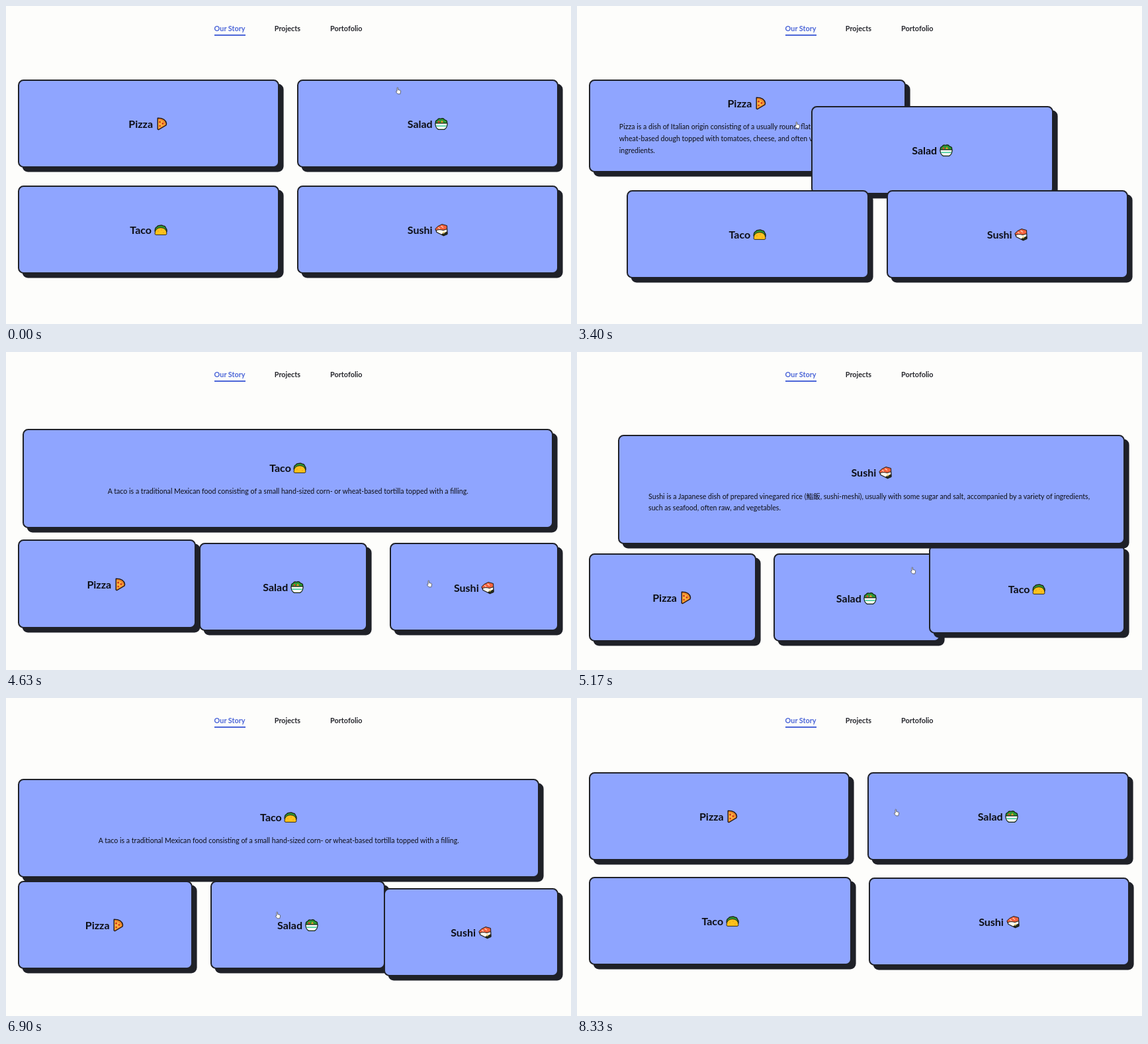
An HTML page that plays this animation: 854x480 px, repeating every 8360 ms.

```html
<!DOCTYPE html>
<html lang="en">
<head>
<meta charset="utf-8">
<title>Expanding cards</title>
<style>
  html, body { margin: 0; width: 100%; height: 100%; overflow: hidden; }
  body { position: relative; background: #fdfdfb; color: #0d0e14; font-family: Lato, "Noto Sans CJK JP", "Noto Sans CJK", sans-serif; }
  nav span { position: absolute; top: 24.7px; font: 700 10.85px/17px Lato, sans-serif; color: #25262c; white-space: nowrap; }
  nav .on { color: #4c66d8; }
  nav .on::after { content: ""; position: absolute; left: 0; right: 0; top: 18.5px; height: 2px; background: #4c66d8; }
  .card {
    position: absolute; box-sizing: border-box; padding: 1.2px 43.8px 0; border: 2px solid #1f2128; border-radius: 8.5px;
    background: #8fa5ff; box-shadow: 6.6px 6.6px 0 #1f2128;
    display: flex; flex-direction: column; align-items: center; justify-content: center;
  }
  h2 { margin: 0; flex: none; font-size: 16px; line-height: 26px; font-weight: 700; white-space: nowrap; display: flex; align-items: center; }
  h2 svg { width: 20px; height: 20px; margin-left: 3.6px; }
  p { margin: 14.6px 0 0; padding-bottom: 1.8px; flex: none; max-width: 100%; font-size: 10.6px; line-height: 17.8px; }
  #cursor { position: absolute; left: 0; top: 0; width: 10px; height: 12px; overflow: visible; }
</style>
</head>
<body>
<nav>
  <span class="on" style="left:314.6px">Our Story</span>
  <span style="left:405.8px">Projects</span>
  <span style="left:490.1px">Portofolio</span>
</nav>

<div class="card">
  <h2>Pizza<svg viewBox="0 0 20 20" stroke="#1c1210" stroke-width="1.3" stroke-linejoin="round">
    <path d="M3.2 1.2Q15 1 16.6 9.6L16 12 4.6 18.8 3.2 18Z" fill="#e8842a"/>
    <path d="M4 4Q12 4 14 11L4.4 17Z" fill="#fbb03c" stroke="none"/>
    <g fill="#d0301f" stroke="none"><circle cx="6.5" cy="7" r="1.5"/><circle cx="11" cy="9.5" r="1.4"/><circle cx="6.6" cy="13" r="1.3"/></g>
  </svg></h2>
  <p>Pizza is a dish of Italian origin consisting of a usually round, flat base of leavened wheat-based dough topped with tomatoes, cheese, and often various other ingredients.</p>
</div>

<div class="card">
  <h2>Salad<svg viewBox="0 0 20 20" stroke="#10200c" stroke-width="1.2" stroke-linejoin="round">
    <path d="M1.5 9Q.5 5 4 4 5.5 1 9 2.2 13 .5 15 3.8 19.5 4.5 18.5 9Z" fill="#2f9a35"/>
    <path d="M.8 9H19.2Q19 16 14.5 18.4H5.5Q1 16 .8 9Z" fill="#f8f9f4"/>
    <path d="M2 12.2H18L17.3 14H2.7Z" fill="#4fd0a4" stroke="none"/>
    <path d="M9 8L11 4.5 13 8Z" fill="#f0982e" stroke="none"/>
    <circle cx="6" cy="6.7" r="1.5" fill="#e0452e" stroke="none"/>
  </svg></h2>
  <p></p>
</div>

<div class="card">
  <h2>Taco<svg viewBox="0 0 20 20" stroke="#1c1a10" stroke-width="1.2" stroke-linejoin="round">
    <path d="M1 12Q1 6.5 4 5.5 5 3 8 3.4 11 2 13.5 3.8 17 4 17.5 7 19.5 9 19 13L17 14Z" fill="#2f9a35"/>
    <path d="M1 15.8Q1.2 6.8 10 6.6 18.8 6.8 19 15.8 18.8 17.4 17 17.4H3Q1.2 17.4 1 15.8Z" fill="#fdc21c" stroke-width=".9"/>
    <g fill="#e8941a" stroke="none"><circle cx="6" cy="12" r=".8"/><circle cx="11" cy="10" r=".8"/><circle cx="14" cy="14" r=".8"/></g>
  </svg></h2>
  <p>A taco is a traditional Mexican food consisting of a small hand-sized corn- or wheat-based tortilla topped with a filling.</p>
</div>

<div class="card">
  <h2>Sushi<svg viewBox="0 0 20 20" stroke="#1c1a16" stroke-width="1.2" stroke-linejoin="round">
    <path d="M1.5 9.5L12 6 18.8 9V16L13 18.5 3 13.5Z" fill="#fbf8ee"/>
    <path d="M.8 8.5Q4 4 11 1.5L18.5 3.5 18.8 8.5 13 10.5Q6 8.5 2 11Z" fill="#f4623e" stroke-width="1"/>
    <path d="M5 6.3L8 8.2M9.5 4L13 6.5" stroke="#ffd9c4" stroke-width="1.1"/>
    <path d="M11 16.5L18.8 13V16.5L13.5 18.8Z" fill="#24301c"/>
    <circle cx="13.5" cy="14" r="1.6" fill="#e9d37a" stroke="none"/>
  </svg></h2>
  <p>Sushi is a Japanese dish of prepared vinegared rice (鮨飯, sushi-meshi), usually with some sugar and salt, accompanied by a variety of ingredients, such as seafood, often raw, and vegetables.</p>
</div>

<svg id="cursor" viewBox="0 0 10 12" fill="#fff" stroke="#4a4b52" stroke-width=".8" stroke-linejoin="round">
  <path id="hand" d="M3 7V1.5Q3.8.4 4.6 1.5V4.5L8 5.3Q8.8 5.6 8.6 7L7.800 10.8H4.200L1.4 7.5Q1.6 6.300 3 7Z"/>
  <path id="arrow" d="M2 1V9.5L4 7.7 5.3 10.6 6.6 10 5.3 7.2H8Z"/>
</svg>

<script>
const LOOP = 8360, RATE = 8.6 / 1000;
const LEFT = 18, TOP = 111, GAP = 27, ROW = 133, WIDE = 817;
const PIZZA = 0, TACO = 2, SUSHI = 3, NONE = -1;

// [time, card left open by the click]
const clicks = [[3304, PIZZA], [3994, TACO], [4684, SUSHI], [5549, NONE], [6394, TACO], [7466, NONE]];

// [time, x, y] of the pointer
const path = [
  [0, 593, 128], [800, 490, 172], [1700, 300, 205], [2500, 380, 215], [3250, 333, 180], [3400, 333, 180],
  [3980, 443, 379], [4120, 443, 379], [4600, 640, 350], [4700, 640, 350], [5170, 508, 330], [5540, 398, 206],
  [5900, 392, 201], [6360, 405, 328], [6900, 411, 328], [7440, 436, 205], [8330, 483, 173]
];

const cards = [...document.querySelectorAll(".card")];
const notes = cards.map(c => c.querySelector("p"));
const byId = id => document.getElementById(id);
const mix = (a, b, p) => a + (b - a) * p;
const settle = ms => 1 - (1 + RATE * ms) * Math.exp(-RATE * ms);

function layout(open) {
  if (open === NONE) {
    const w = (WIDE - GAP) / 2;
    return cards.map((_, i) => [LEFT + (i % 2) * (w + GAP), TOP + (i >> 1) * (ROW + GAP), w, ROW]);
  }
  // two lines of text overflow the page and leave room for a scrollbar
  const short = open === TACO;
  const full = short ? WIDE : WIDE - 7.5, high = short ? 150 : 167.8;
  const w = (full - 2 * GAP) / 3;
  let col = 0;
  return cards.map((_, i) => i === open
    ? [LEFT, TOP, full, high]
    : [LEFT + col++ * (w + GAP), TOP + high + GAP, w, ROW]);
}

function stateAt(t) {
  let open = NONE, boxes = layout(NONE);
  clicks.forEach(([start, next], i) => {
    if (t < start) return;
    const end = i + 1 < clicks.length ? Math.min(t, clicks[i + 1][0]) : t;
    const p = settle(end - start), goal = layout(next);
    boxes = boxes.map((b, k) => b.map((v, j) => mix(v, goal[k][j], p)));
    open = next;
  });
  return { open, boxes };
}

function pointerAt(t) {
  const i = path.findIndex(k => k[0] > t);
  if (i < 0) return path[path.length - 1].slice(1);
  const [t0, x0, y0] = path[i - 1], [t1, x1, y1] = path[i];
  const u = (t - t0) / (t1 - t0), p = u * u * (3 - 2 * u);
  return [mix(x0, x1, p), mix(y0, y1, p)];
}

function draw() {
  const t = performance.now() % LOOP;
  const { open, boxes } = stateAt(t);
  boxes.forEach(([x, y, w, h], i) => {
    const s = cards[i].style;
    s.left = x + "px";
    s.top = y + "px";
    s.width = w + "px";
    s.height = h + "px";
    notes[i].style.display = i === open ? "" : "none";
  });
  const [cx, cy] = pointerAt(t);
  const over = boxes.some(([x, y, w, h]) => cx > x && cx < x + w && cy > y && cy < y + h);
  byId("hand").style.display = over ? "" : "none";
  byId("arrow").style.display = over ? "none" : "";
  byId("cursor").style.transform = `translate(${cx - 5}px, ${cy - 6}px)`;
  requestAnimationFrame(draw);
}
draw();
</script>
</body>
</html>
```
